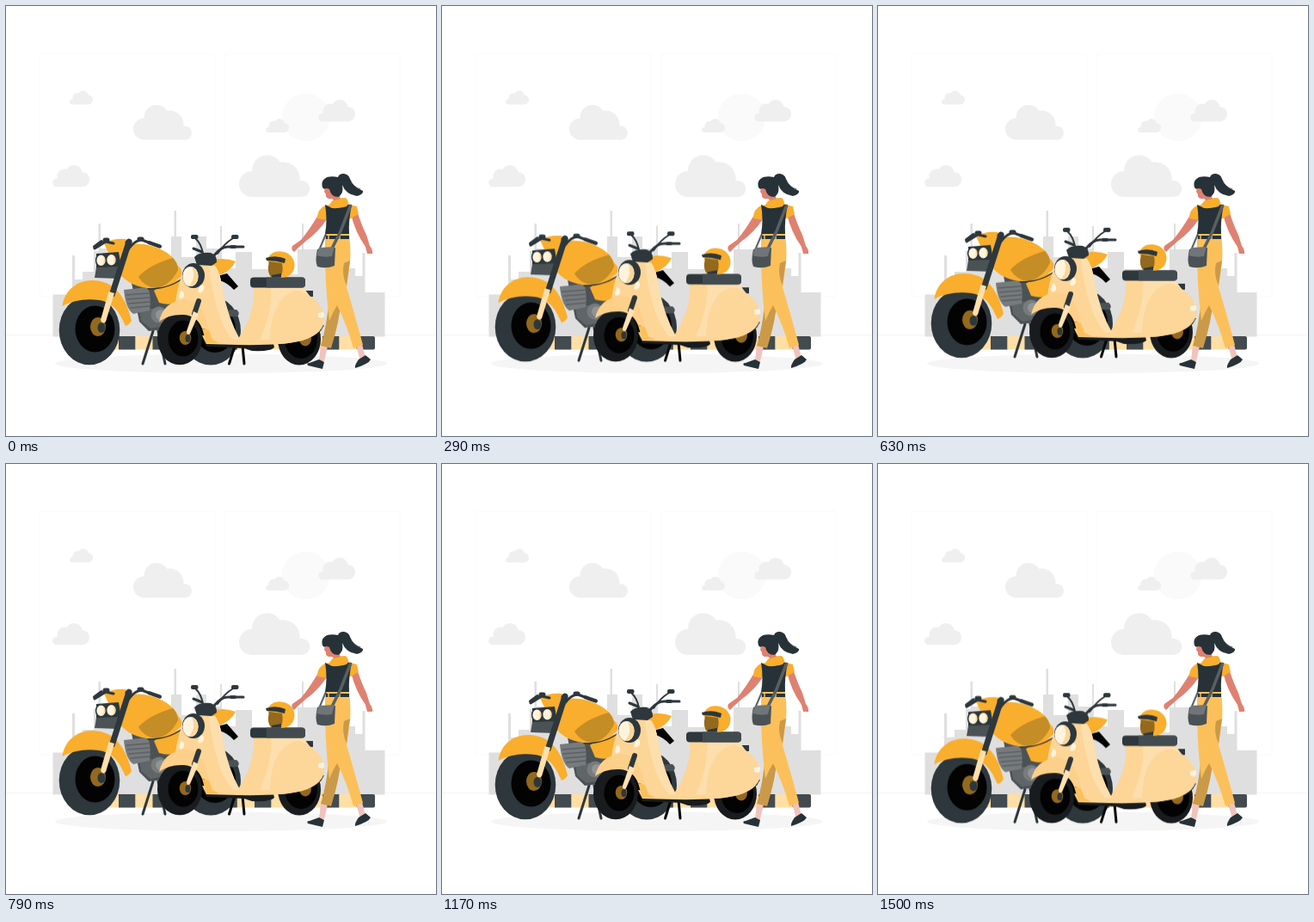
These frames come from a looping animation (500x500 px, 1.54 s). An HTML page:

```html
<!DOCTYPE html>
<html lang="en">
<head>
<meta charset="utf-8">
<title>Motorbikes</title>
<style>
html, body { margin: 0; width: 100%; height: 100%; overflow: hidden; background: #fff; }
svg { display: block; width: 100vw; height: 100vh; }
.orange { fill: #f9ae2d; }
.amber { fill: #fcc05a; }
.gold { fill: #c48d26; }
.brown { fill: #93691d; }
.shade { fill: #cb9a48; }
.sand { fill: #fdd596; }
.pale { fill: #fddfae; }
.cream { fill: #fff3dc; }
.dark { fill: #2d373c; }
.ink { fill: #263238; }
.tyre { fill: #181c1e; }
.black { fill: #030303; }
.steel { fill: #4b5256; }
.grey { fill: #777b7d; }
.skin { fill: #df8171; }
.line { fill: none; stroke: #2d373c; stroke-linecap: round; stroke-linejoin: round; }
</style>
</head>
<body>
<svg viewBox="0 0 500 500">
  <defs>
    <g id="bigCloud">
      <circle cx="160.5" cy="143" r="12.5"/><circle cx="175" cy="129.5" r="14.5"/>
      <circle cx="190" cy="138" r="16.5"/><circle cx="208" cy="147.5" r="8"/>
      <path d="M160 135H190L208 140V155.5H160Z"/>
    </g>
    <g id="smallCloud">
      <circle cx="5" cy="20.5" r="4.8"/><circle cx="14" cy="13" r="8.5"/>
      <circle cx="25" cy="9.6" r="9.6"/><circle cx="34.5" cy="16.6" r="8.6"/>
      <path d="M5 15.8L14 10H34V25.2H5Z"/>
    </g>
  </defs>

  <g fill="none" stroke="#fafafa">
    <rect x="39" y="55" width="203.500" height="283" rx="2"/>
    <rect x="255" y="55" width="203" height="283" rx="2"/>
    <path d="M0 382.500H500" stroke="#f5f5f5"/>
  </g>
  <circle cx="348.500" cy="129.500" r="27.800" fill="#fafafa"/>
  <g fill="#efefef">
    <use href="#bigCloud"/>
    <use href="#bigCloud" transform="translate(91.9 35.5) scale(1.21 1.2)"/>
    <use href="#smallCloud" transform="translate(54 185)"/>
    <use href="#smallCloud" transform="translate(363 109)"/>
    <use href="#smallCloud" transform="translate(74 98.500) scale(.63)"/>
    <use href="#smallCloud" transform="translate(302 131) scale(.63)"/>
  </g>

  <path fill="#dfdfdf" d="M54.500 384.500V335.500H77V290H80V318H89V309H102V285H107.500V253H110V282H135V300H160V320H192V268H195.500V238H198V268H204V292H221V268H233V282H249V256H251V305H267V286H286V306H320V312H339V283H344V253H346V283H378V305H406V314H414.500V287H417.500V333H440.500V384.500Z"/>
  <ellipse cx="250" cy="415.800" rx="193" ry="11.200" fill="#f5f5f5"/>

  <rect x="112" y="384" width="317" height="15.500" rx="2" fill="#ffdfa6"/>
  <g id="curb" fill="#424b50"></g>

  <g id="bikes">
    <g id="motorcycle">
      <path class="line" stroke-width="3" d="M171 378L159 416M177 378L185 416"/>
      <ellipse class="dark" cx="238" cy="377.500" rx="35" ry="40"/>
      <ellipse class="black" cx="243" cy="376" rx="24" ry="27"/>
      <path class="steel" d="M246 354L268 353Q273 357 269 361L248 362Z"/>
      <path class="black" d="M246 314L257 311L270 326L265 330Q258 322 248 319Z"/>
      <path class="orange" d="M232 299Q250 290 267 297Q262 308 246 314L238 320Z"/>

      <path class="steel" d="M146 322L196 326L214 345L202 374L166 378L155 367Z"/>
      <path d="M155 352H193L190 371L168 375L157 366Z" fill="#606568"/>
      <path class="grey" d="M137 330L165 327Q169 337 167 354L148 358Q139 352 137 330Z"/>
      <path class="line" style="stroke:#5c6164" stroke-width="1.300" d="M140 336L166 334M141 341L167 339M143 346L167 344M145 351L167 349"/>
      <circle class="grey" cx="178" cy="359" r="9.500"/>
      <circle cx="180" cy="359" r="6" fill="#919495"/>
      <path class="orange" d="M172 331Q186 320 205 318L211 333L202 344Q190 349 178 345Z"/>

      <ellipse class="dark" cx="97" cy="377" rx="35.300" ry="40.300"/>
      <ellipse class="black" cx="103.500" cy="375.500" rx="23" ry="27"/>
      <ellipse class="brown" cx="107" cy="373" rx="9" ry="11"/>
      <ellipse class="dark" cx="111" cy="374" rx="4.500" ry="6"/>
      <path class="orange" d="M65.500 349C68 331 82 319 100 319C128 319 140 341 146 366Q143 371 139 372C132 356 124 344 108 342Q84 339 65.500 349Z"/>

      <path class="orange" d="M114 276Q124 270 139 271L146 277C169 274 196 288 200 302Q207 308 203 315Q186 330 164 328Q139 325 127 304Z"/>
      <path class="gold" d="M154 315Q166 301 194 293Q200 300 200 307Q191 325 175 328Q161 327 154 315Z"/>
      <path class="line" stroke-width="1.500" d="M165 329Q189 329 205 317"/>
      <path class="dark" d="M105 288L131 286L134 304L105 308Z"/>
      <path class="steel" d="M105 304L134 303L131 317L103 316Z"/>
      <g class="cream" stroke="#2d373c" stroke-width="1.500">
        <ellipse cx="110.500" cy="295.800" rx="5.900" ry="7"/><ellipse cx="122.500" cy="295.300" rx="5.900" ry="7"/>
      </g>
      <path fill="#fbd28a" d="M112 290Q116 295 112 301Q116 297 115 293ZM124 289Q128 295 124 301Q128 297 127 293Z"/>
      <path class="line" stroke-width="7" stroke-linecap="butt" d="M143 274L123.500 335"/>
      <path d="M119.500 332L126 334L116 367Q112 371 110 365Z" fill="#ffdfaa"/>
      <path class="line" stroke-width="3" d="M125 276L116 274L103 282M142 283Q150 272 158 272L179 280"/>
      <path class="line" stroke-width="4" d="M103 280L111 274M166 275L179 279.500"/>
      <path class="line" stroke-width="5" d="M115 272H118M155 271H158M141 275H144"/>
    </g>

    <g id="scooter">
      <path class="line" stroke-width="3" style="stroke:#080808" d="M266 395L259.500 416M275 395L277 416"/>
      <ellipse class="tyre" cx="341" cy="387.500" rx="25" ry="30"/>
      <ellipse class="black" cx="343" cy="387" rx="19" ry="23"/>
      <ellipse class="brown" cx="348" cy="387" rx="7" ry="8.500"/>
      <path class="tyre" d="M228 386L310 388L312 397Q308 402 286 401L277 398L233 396Z"/>
      <path class="dark" d="M344 380Q353 370 370 371L366 378Q356 381 346 389ZM345 331H357V338H348Z"/>

      <path class="sand" d="M288 326H345Q348 333 353 337Q368 346 370 364Q370 381 345 389Q320 395 270 394L233 393L228 383L270 387C280 372 290 350 288 326Z"/>
      <path class="pale" d="M308 326H345L353 337Q320 337 309 372L307 388H295Q310 356 308 326Z"/>
      <path fill="#fdd699" d="M308 393C305 360 319 331 341 331Q354 336 362 345Q371 355 370 366C367 386 334 394 308 393Z"/>
      <path class="cream" d="M363 357L369 356Q372 360 368 363L363 362Z"/>

      <ellipse class="tyre" cx="202" cy="387" rx="26" ry="30.300"/>
      <ellipse class="black" cx="206" cy="386.500" rx="17.500" ry="21"/>
      <ellipse class="brown" cx="208.500" cy="386" rx="6.800" ry="8"/>
      <ellipse class="dark" cx="211.500" cy="386.500" rx="3" ry="4.500"/>

      <path class="sand" d="M204 315L226 299L243 302Q249 309 252 330Q258 362 272 388L250 392L230 386Q236 363 224 350L197 345Q199 328 204 315Z"/>
      <path class="pale" d="M236 303Q240 336 247 356Q252 374 264 388H272Q257 362 252 330Q249 309 243 302Z"/>
      <path d="M178 367Q183 344 207 341Q230 341 236 377L228 375Q222 360 207 359Q190 358 178 367Z" fill="#fdd08a"/>
      <path class="amber" d="M228 375L236 377L240 388L248 392L233 392Z"/>
      <path class="line" stroke-width="6" stroke-linecap="butt" d="M224 343L219 358"/>
      <path fill="#ffe2b3" d="M218 355L224 358L214 381Q210 384 210 378Z"/>
      <path class="cream" d="M203 331Q208 331 207 338Q203 343 201 338ZM226 324Q231 323 230 330Q226 336 223 332Z"/>

      <path class="dark" d="M219 292Q224 286 238 287Q246 290 245 298L239 302L222 301Z"/>
      <ellipse class="dark" cx="218" cy="313.500" rx="13" ry="14.500"/>
      <ellipse class="cream" cx="214.500" cy="314.500" rx="9.200" ry="11.500"/>
      <path fill="#fbd596" d="M216 303Q225 308 223 318Q219 326 213 326Q222 315 216 303Z"/>
      <path class="line" stroke-width="2" d="M220 270Q227 276 229 288M264 270Q254 276 246 288"/>
      <path class="line" stroke-width="3" d="M218 282L228 286M242 290Q250 280 258 280L276 280"/>
      <path class="line" stroke-width="4" d="M262 280H266"/>
      <rect class="dark" x="215" y="266" width="8.500" height="5" rx="2"/>
      <rect class="dark" x="262" y="266" width="8.500" height="5" rx="2"/>

      <rect class="dark" x="284" y="315.500" width="64" height="12" rx="4"/>
      <path fill="#414b50" d="M303 315.500H344Q348 315.500 348 320V323Q348 327.500 344 327.500H303Z"/>
      <path class="orange" d="M304 295C307 285 319 283 328 288C339 295 337 310 328 314Q323 317 317 315L308 306Z"/>
      <path class="brown" d="M306 297L321 299Q323 309 319 315H308Q303 309 306 297Z"/>
      <path class="dark" d="M302 293Q314 289 325 294L324 299Q314 296 303 296ZM309 313L320 311V315.500H309Z"/>
    </g>
  </g>

  <g id="walker">
    <path fill="#f1c3bd" d="M366 394L374 396L370 413H364ZM407 394L414 393L418 409L412 413Z"/>
    <path class="ink" d="M364 411L370 414L368 422L351 418Q349 415 353 415ZM410 411L418 406L424 411Q422 416 406 421Q405 418 410 411Z"/>
    <path class="skin" d="M363 243L373 248Q362 264 349 273L340 281L335 286Q331 284 333 279L343 272Q353 260 363 243ZM401 242L409 241Q414 256 419 266L423 279Q427 283 426 288L420 288L418 280Q406 263 401 242Z"/>
    <path class="shade" d="M376 340H390Q388 366 378 398L366 395Q373 372 376 340Z"/>
    <path class="amber" d="M371 265H399Q402 290 399 306L396 327Q405 357 415 394L404 398Q397 372 385 348Q380 356 376 366Q370 320 371 265Z"/>
    <path class="shade" d="M393 299L400 296L396 325Q390 312 393 299Z"/>
    <path class="orange" d="M377 231Q378 223 395 223L399 231L408 233L410 242L401 247L373 249L362 247Q362 236 371 232Z"/>
    <path class="ink" d="M371 231L379 235Q389 236 397 231L402 231Q398 250 399 265H371Q374 249 371 231ZM372 267H399V271H372Z"/>
    <path d="M375 266V272M388 266V272" stroke="#fcc05a" stroke-width="1.500"/>
    <path class="skin" d="M371 211L386 214L389 225Q383 229 379 224Q371 225 372 219L370 216Z"/>
    <path class="orange" d="M376 231Q381 223 396 224Q400 229 396 233Q384 237 376 231Z"/>
    <path class="ink" d="M368 211C365 201 374 196 386 199C388 193 398 194 400 201Q402 210 415 215Q416 219 408 221Q395 219 391 208Q393 219 386 222Q378 222 376 213Q372 211 370 213Z"/>
    <path class="line" stroke-width=".8" d="M400 202Q404 211 412 213"/>
    <path fill="none" stroke="#595f62" stroke-width="3.500" d="M401 231L389 262L377 286"/>
    <path fill="none" stroke="#595f62" stroke-width="2" d="M372 265L364 284"/>
    <path class="steel" d="M362 283L383 281L382 302Q373 306 362 303Q359 296 362 283Z"/>
    <path fill="#6f7578" d="M364 281L382 280L379 291Q370 293 361 290Z"/>
  </g>
</svg>
<script>
const NS = "http://www.w3.org/2000/svg";
const LOOP = 1540, LIFT = 10;

const curb = document.getElementById("curb");
for (let i = 0; i < 8; i++) {
  const block = document.createElementNS(NS, "rect");
  const attrs = { x: 131 + i * 39.5, y: 384, width: i < 7 ? 19.3 : 21.5, height: 15.5, rx: i < 7 ? 0 : 2 };
  for (const name in attrs) block.setAttribute(name, attrs[name]);
  curb.append(block);
}

// Both bikes bob together at constant speed, slightly ahead of the loop start.
const shift = y => ({ transform: `translate(0px, ${y}px)` });
document.getElementById("bikes").animate(
  [shift(0.4), shift(0.4 - LIFT), shift(0.4)],
  { duration: LOOP, iterations: Infinity, easing: "linear", delay: -30 }
);
</script>
</body>
</html>
```
